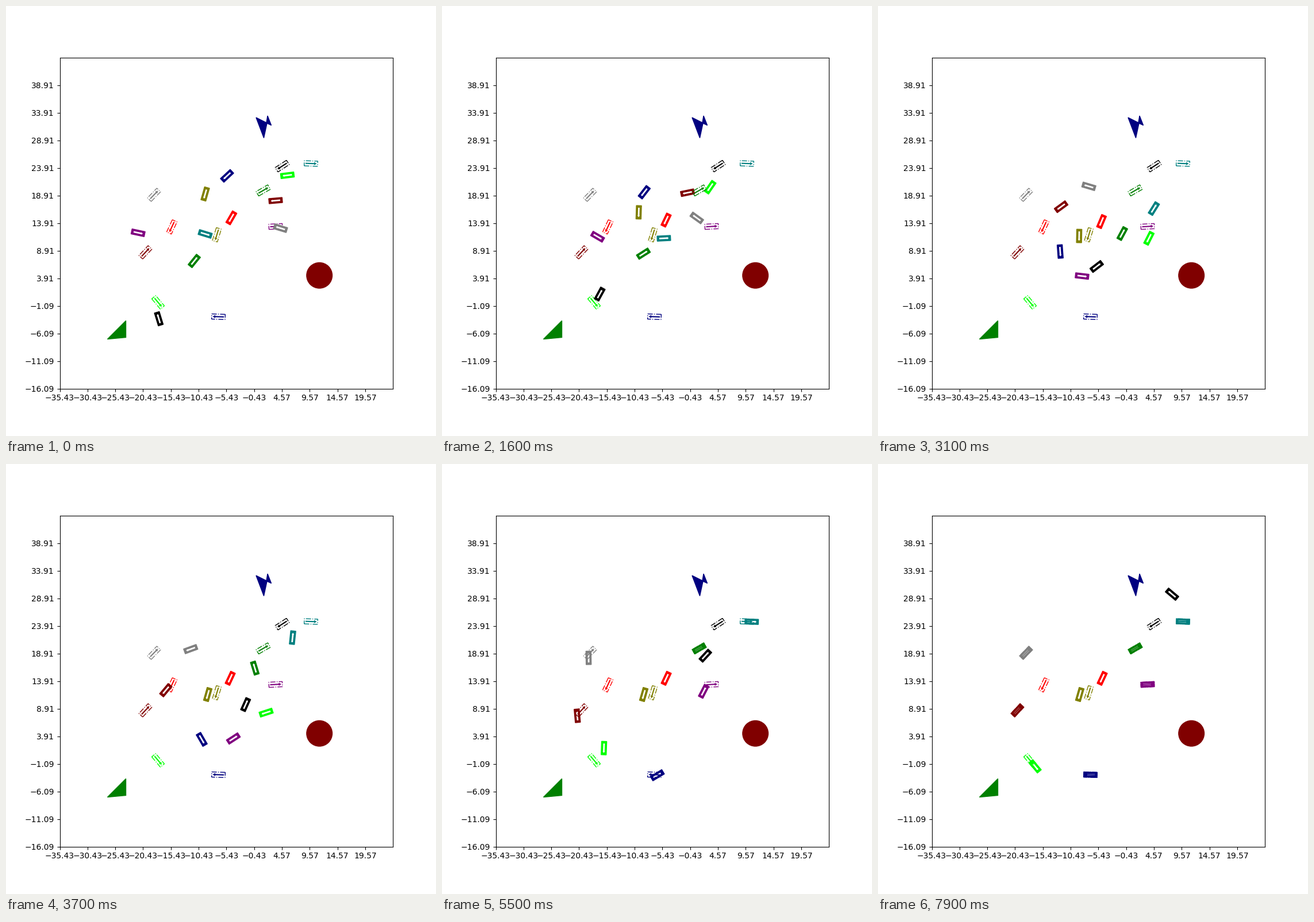
These frames come from a looping animation (748 by 748 pixels, 8 s). A matplotlib script:

```python
import numpy as np
import matplotlib.pyplot as plt
from matplotlib.animation import FuncAnimation
from matplotlib.patches import Circle, Polygon
from matplotlib.transforms import Affine2D

SIZE = 748
X0, Y0, SPAN = -35.43, -16.09, 60
START = 0.1                                # seconds
STOPS = [START, 2.4, 3.7, 4.7, 6.4, 7.9]   # when a car passes its poses
BACK_UP = 1.2                              # time to reverse onto the goal

fig, ax = plt.subplots(figsize=(SIZE / 100, SIZE / 100), dpi=100)
ax.set_xlim(X0, X0 + SPAN)
ax.set_ylim(Y0, Y0 + SPAN)
ax.set_xticks(X0 + 5 * np.arange(12))
ax.set_yticks(Y0 + 5 * np.arange(12))

# pixel centres of the stage, y pointing down
stage = Affine2D().scale(1, -1).translate(0.5, SIZE - 0.5)


def add(patch):
    patch.set_transform(stage)
    return ax.add_patch(patch)


def arrow(tail, tip, shaft, head, head_len):
    neck = tip - head_len
    side = [(tail, shaft / 2), (neck, shaft / 2), (neck, head / 2), (tip, 0)]
    return np.array(side + [(x, -y) for x, y in side[-2::-1]])


BOX = np.array([(-1, -1), (1, -1), (1, 1), (-1, 1)]) * (11.7, 4.5)
GOAL_ARROW = arrow(-9.5, 10, 2.1, 5.4, 4.5)
CAR_ARROW = arrow(-8, 8.5, 2.7, 4.4, 3)


def ahead(heading):
    """Unit vector of a heading in degrees, counter-clockwise from east."""
    a = np.radians(heading)
    return np.array([np.cos(a), -np.sin(a)])


def place(shape, x, y, heading):
    return (x, y) + shape[:, :1] * ahead(heading) + shape[:, 1:] * ahead(heading + 90)


class Car:
    """Drives through its poses (x, y, heading), passes the goal by `over`
    pixels at time `arrive` and then reverses onto it."""

    def __init__(self, color, goal, *poses, arrive=None, over=0):
        keys = list(zip(STOPS, poses))
        if arrive:
            past = goal[:2] + over * ahead(goal[2])
            keys += [(arrive, (*past, goal[2])), (arrive + BACK_UP, goal)]
        self.times = [t for t, _ in keys]
        self.poses = np.array([p for _, p in keys], float)
        self.body = add(Polygon(BOX, facecolor=color, edgecolor=color, lw=1))
        self.mark = add(Polygon(CAR_ARROW, facecolor="white", lw=0))
        add(Polygon(place(BOX, *goal), fill=False, edgecolor=color, lw=1, ls="-."))
        add(Polygon(place(GOAL_ARROW, *goal), facecolor=color, lw=0))

    def pose(self, t):
        i = np.searchsorted(self.times, t, side="right") - 1
        if i >= len(self.times) - 1:
            return self.poses[-1]
        t0, t1 = self.times[i:i + 2]
        s = (t - t0) / (t1 - t0)
        if i == 0:
            s **= 1.9              # pull away from rest
        p, q = self.poses[i:i + 2]
        heading = p[2] + s * (q[2] - p[2])
        # curve that leaves and arrives along the headings, in either gear
        chord = q[:2] - p[:2]
        gear = np.sign(chord @ ahead((p[2] + q[2]) / 2))
        pull = gear * np.hypot(*chord)
        x, y = (p[:2] + s * s * (3 - 2 * s) * chord
                + s * (1 - s) ** 2 * pull * ahead(p[2])
                - s * s * (1 - s) * pull * ahead(q[2]))
        return x, y, heading

    def move(self, t):
        pose = self.pose(t)
        self.body.set_xy(place(BOX, *pose))
        self.mark.set_xy(place(CAR_ARROW, *pose))
        return self.body, self.mark


# obstacles
add(Polygon([(208, 547), (176, 579), (208, 576)], color="green"))
add(Polygon([(434.5, 193.5), (452.5, 202.5), (454.5, 190.5), (461, 207),
             (453.5, 203.5), (448, 229)], color="navy"))
add(Circle((544.7, 468.2), 22.3, color="maroon"))

cars = [
    Car("red", (288, 383.8, 245),
        (391.5, 368, 240), (387, 377, 250), (389.5, 372.3, 245)),
    Car("navy", (369, 540, 178),
        (384, 295, 223), (317.5, 364.5, 244), (340, 478.5, 300), (387, 535, 240),
        arrive=6.4, over=14),
    Car("lime", (264, 515, 310),
        (489, 294, 187), (464, 357, 296), (452, 432, 198), (345, 467.5, 201),
        (258, 522, 343), arrive=7.9, over=13.5),
    Car("maroon", (242, 428, 47),
        (468.5, 338, 185), (375.5, 311, 200), (277.5, 393, 230), (234, 453.5, 138),
        arrive=6.4, over=13),
    Car("olive", (366.3, 397.5, 253),
        (346, 326.5, 254), (347.5, 398.5, 286), (350.5, 400.5, 254)),
    Car("green", (447, 320.3, 30),
        (327, 443, 51), (385, 425.5, 9), (432.3, 354.5, 107), arrive=4.7),
    Car("purple", (468.5, 383, 3),
        (229.3, 394, -12), (313, 423, -53), (395, 477, 33), (448.5, 414.5, 116),
        arrive=6.4, over=10.5),
    Car("teal", (530, 273.5, -2),
        (346, 396, -17), (433.5, 395, 28), (498, 301.5, 84), (529, 272, -8),
        arrive=5.2, over=11),
    Car("gray", (257, 328, 46),
        (477, 386, 163), (410, 332, 121), (320.8, 321.5, 200), (257.5, 344.5, 131),
        arrive=6.4),
    Car("black", (480, 278, 213),
        (265.3, 543.5, 107), (319.3, 468, 4), (416.3, 418, 66), (496, 319, 83),
        (388, 322, 7), (511, 226, 140)),
]


def draw(i):
    t = max(i / 10, START)
    return [part for car in cars for part in car.move(t)]


anim = FuncAnimation(fig, draw, frames=80, interval=100, repeat=True,
                     repeat_delay=0, init_func=lambda: draw(0))
plt.show()
```
